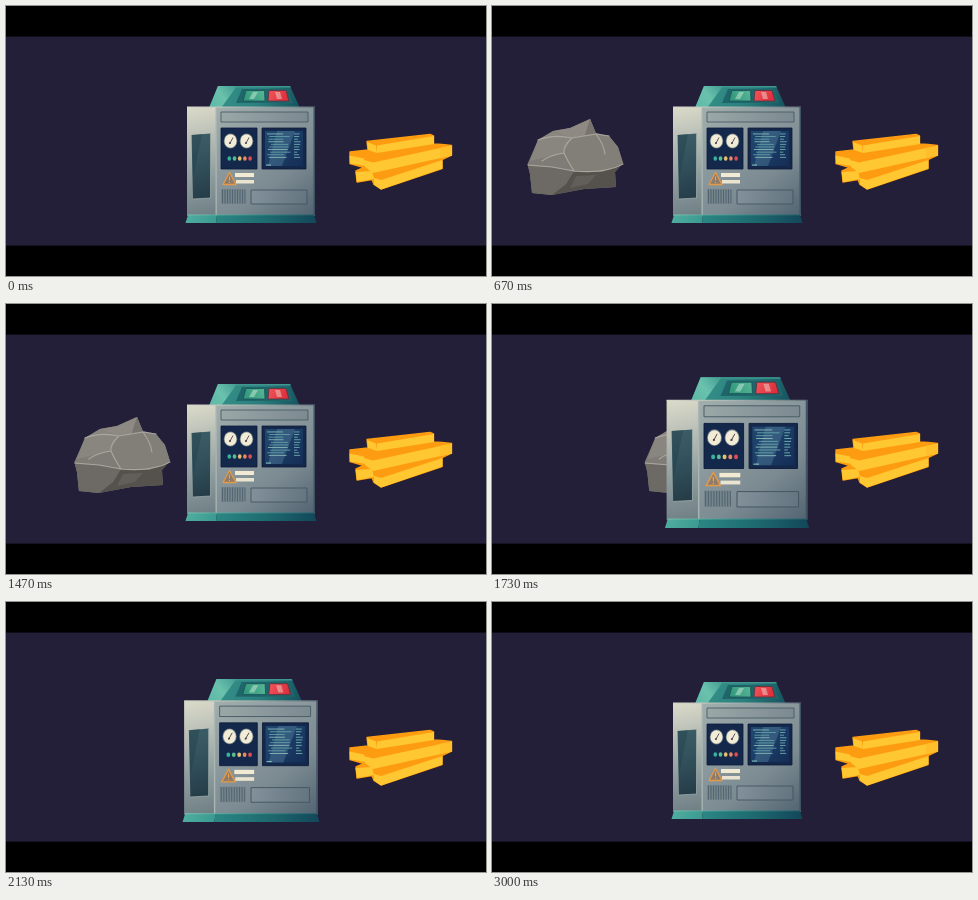
An HTML page with a canvas that plays this animation: 480 by 270 pixels, repeating every 3270 ms.

```html
<!DOCTYPE html>
<html lang="en">
<head>
<meta charset="utf-8">
<title>Rock machine</title>
<style>
html, body { margin: 0; width: 100%; height: 100%; overflow: hidden; background: #000; }
canvas { display: block; width: 480px; height: 270px; }
</style>
</head>
<body>
<canvas id="stage"></canvas>
<script>
const LOOP = 3270, STEP = 1000 / 15, LAST = 48;
const canvas = document.getElementById('stage');
const ratio = window.devicePixelRatio || 1;
canvas.width = 480 * ratio;
canvas.height = 270 * ratio;
const g = canvas.getContext('2d');

// Machine size over time: [ms, scale]
const PULSE = [[1600, 1], [1733, 1.1], [1933, .95], [2067, 1.07], [2133, 1.045], [2267, .98], [2400, 1.01], [2533, 1]];

function shape(d, fill, line, width = 1) {
  const p = new Path2D(d);
  if (fill) { g.fillStyle = fill; g.fill(p); }
  if (line) { g.strokeStyle = line; g.lineWidth = width; g.stroke(p); }
}
function rect(x, y, w, h, fill, line, width = 1) {
  if (fill) { g.fillStyle = fill; g.fillRect(x, y, w, h); }
  if (line) { g.strokeStyle = line; g.lineWidth = width; g.strokeRect(x, y, w, h); }
}
function oval(x, y, rx, ry, fill) {
  g.fillStyle = fill;
  g.beginPath();
  g.ellipse(x, y, rx, ry, 0, 0, Math.PI * 2);
  g.fill();
}
function blend(x1, y1, x2, y2, ...colors) {
  const b = g.createLinearGradient(x1, y1, x2, y2);
  colors.forEach((c, i) => b.addColorStop(i / (colors.length - 1), c));
  return b;
}
function random(seed) {
  return () => (seed = (seed * 16807) % 2147483647) / 2147483647;
}
function pulse(t) {
  if (t <= PULSE[0][0]) return 1;
  for (let i = 1; i < PULSE.length; i++) {
    const [a, from] = PULSE[i - 1], [b, to] = PULSE[i];
    if (t <= b) return from + (to - from) * (1 - Math.cos(Math.PI * (t - a) / (b - a))) / 2;
  }
  return 1;
}

function drawLid() {
  shape('M212 80H284L294 102H203Z', blend(215, 80, 294, 102, '#359088', '#2a7f7d', '#15525e'));
  shape('M212 80H231L215 102H203Z', blend(205, 102, 230, 82, '#5cb8a5', '#6ac2ad', '#459f95'));
  shape('M231 80H284L285 81.500H230Z', '#3f978f');
  shape('M236 83H282L287 97H230Z', '#1f666b');
  shape('M240 84.500H258.500L259 95H237Z', blend(238, 95, 259, 85, '#2f9679', '#58b696'), '#1a5459', .8);
  shape('M263 84.500H280L283 95H262Z', blend(262, 85, 283, 95, '#f0555a', '#da2937'), '#5a3340', .8);
  shape('M247 86H252L248 93H243ZM269 86H274L276 93H271Z', 'rgba(235,250,235,.4)');
}

function drawBody() {
  rect(181, 101, 30, 109, blend(181, 101, 204, 212, '#dcdbc9', '#b3bab4', '#8c9a9c', '#6d7e84'));
  rect(210, 101, 99, 109, blend(210, 101, 300, 215, '#a2afad', '#8d9b9f', '#7b8a91', '#536573'));
  rect(181, 100.500, 128, 1.2, blend(181, 0, 309, 0, '#d8d8c8', '#a5b0ae', '#647680'));
  rect(209.500, 102, 1.3, 107, '#aab6b3');
  rect(307.500, 101, 1.5, 108, '#405362');
  shape('M185.500 129L204.500 127.500V192L187 193Z', blend(186, 128, 204, 192, '#3c5e67', '#314f5a', '#253c48'));
  shape('M186 129L196 128L187 172Z', 'rgba(28,56,68,.35)');
  shape('M204.500 128V192L187 193', null, '#a3b0ac', .7);
  rect(215, 106, 87, 10, blend(215, 106, 302, 116, '#9ba8a7', '#7b8991'), '#495c66', .9);
}

function drawGauges() {
  rect(215, 122, 36, 41, '#14284c', '#0d1b38', .8);
  for (const x of [224.500, 240.500]) {
    oval(x, 135, 6.8, 7.6, '#6d7d83');
    oval(x, 135, 6, 6.8, '#f2ecd6');
    shape(`M${x - 1} 138L${x + 2.500} 131.500`, null, '#4a4550', .9);
    oval(x - .5, 137, 1, 1, '#4a4550');
  }
  ['#36b49b', '#58bd94', '#e9bd70', '#ec8760', '#de4c55'].forEach((c, i) => oval(223.300 + i * 5.200, 152.500, 1.8, 2.2, c));
}

function drawScreen() {
  rect(256, 122, 44, 41, '#14284c', '#0d1b38', .8);
  rect(259, 125, 38, 35, blend(259, 125, 297, 160, '#21486f', '#1b3c66', '#152d55'));
  shape('M271 125H289L276 160H262Z', 'rgba(125,175,190,.25)');
  const rnd = random(71);
  for (let i = 0; i < 10; i++) {
    const y = 127.500 + i * 2.600;
    rect(261 + rnd() * 4, y, 13 + rnd() * 9, .9, i % 3 ? '#5f9da5' : '#84b5b5');
    rect(288, y, 3 + rnd() * 4, .9, '#6aa9ab');
  }
  rect(260, 158.500, 5, 1.1, '#7fb9b5');
}

function drawLower() {
  shape('M223.500 166.500L230 178.500H217Z', '#8f7b69', '#e39a48', 1.3);
  shape('M223.500 170.500V174.500M223.500 176V177', null, '#f0a64c', 1.1);
  rect(229, 167, 19, 4, '#f2ead2');
  rect(230, 174, 18, 3.5, '#e9e3d0');
  rect(215, 183, 24, 15, '#75858c');
  for (let x = 216; x < 239; x += 2.500) rect(x, 183.500, 1, 14, '#536570');
  rect(245, 184, 56, 14, blend(245, 184, 301, 198, '#83919a', '#637480'), '#435662', .9);
  shape('M182 209H211L210 217H179.500Z', blend(180, 209, 211, 217, '#4fae9f', '#3b9a90'));
  shape('M211 209H308L310.500 217H210Z', blend(210, 0, 310, 0, '#2b8784', '#1e6b70', '#12475a'));
  rect(182, 208.500, 126, .9, blend(182, 0, 308, 0, '#7cc3b1', '#3f9690', '#235f69'));
}

function drawMachine(scale) {
  g.save();
  g.translate(245, 148);
  g.scale(scale, scale);
  g.translate(-245, -148);
  drawLid();
  drawBody();
  drawGauges();
  drawScreen();
  drawLower();
  g.restore();
}

function drawFries() {
  const dark = '#fd9c10', light = '#ffc731';
  g.lineJoin = 'round';
  // whole stack in the shaded tone, lit faces on top
  shape('M344 146L362 144L361 135.500L424 128.500L427.500 130V138L436 138.500L445.500 139.500V149L436 153.500V162.500L375 183L368 178.500L366 173.500L351 176L350 165L358 161.500L344 157.500Z', dark, dark, 1.4);
  shape('M343.500 149.500L358 152.500L360 160L344 157.500Z', light);
  shape('M349.500 166L366 165L368 173L351 176Z', light);
  shape('M361 136L370 139.500L371 147L362 144Z', light);
  shape('M371 139.500L428 130V138L371 147Z', light);
  shape('M368 172L375 174V183.500L368 178.500Z', light);
  shape('M375 174L436.500 154V162.500L375 183.500Z', light);
  shape('M358 154L367 156.500L446 139.500V149.500L367 167L359 161Z', light);
  shape('M434 142L446 139.500V149.500L434 152.200Z', '#ffbf2a');
}

function drawRock(dx, dy) {
  g.save();
  g.translate(dx, dy);
  g.lineJoin = g.lineCap = 'round';
  shape('M35.500 158L46 134L61 125L78 122L98 113L104 127L117 130L126 141L131 157L123 166L124 181L92 183L60 189L40 187L38 168Z', '#7f7b76');
  shape('M61 125L78 122L98 113L104 128L80 132Z', '#8e8a83');
  shape('M98 113L104 128L93 129Z', '#77736e');
  shape('M46 134L61 125L80 132L72 147L38 155Z', '#89857f');
  shape('M80 132L104 128L117 130L126 141L131 157L110 165L82 164L72 147Z', '#827e78');
  shape('M36 160L60 161L82 165L74 178L60 189L40 187L38 168Z', '#6d6964');
  shape('M82 165L110 166L130 158L123 166L124 181L92 183L60 189L74 178Z', '#55514d');
  shape('M84 170L104 169L96 178L78 182Z', '#625e59');
  shape('M46 134Q61 128 80 132L104 128L117 130M80 132Q71 140 72 147Q76 156 82 165M72 147Q58 149 50 155M36 159L60 161L82 165Q112 168 131 158M104 128Q112 139 113 148', null, '#aaa69e', 1.2);
  g.restore();
}

function puff(x, y, r, alpha) {
  const c = g.createRadialGradient(x, y, 0, x, y, r);
  c.addColorStop(0, `rgba(226,224,225,${alpha})`);
  c.addColorStop(.5, `rgba(212,210,214,${alpha * .5})`);
  c.addColorStop(1, 'rgba(200,198,206,0)');
  g.fillStyle = c;
  g.fillRect(x - r, y - r, r * 2, r * 2);
}

function drawDust(t) {
  if (t < 320 || t > 660) return;
  const u = (t - 333) / 333, fade = Math.pow(1 - u, 1.4), rnd = random(419);
  for (let i = 0; i < 110; i++) {
    const side = i % 2 ? 1 : -1, far = rnd();
    const x = 84 + side * (10 + far * 90) * (1 + u * .3);
    const y = 184 - far * 13 + (rnd() - .5) * (8 + far * 36) - u * 10;
    const r = (6 + far * 7 + rnd() * 9) * (1 + u * .5);
    puff(x, y, r, (.12 + rnd() * .26) * fade);
  }
  for (let i = 0; i < 32; i++) {
    const x = 84 + (rnd() - .5) * 185, y = 105 + rnd() * 85;
    const r = .3 + rnd() * .5;
    oval(x, y - u * 14, r, r, `rgba(220,218,222,${.5 * fade})`);
  }
}

function draw(t) {
  g.setTransform(ratio, 0, 0, ratio, 0, 0);
  rect(0, 0, 480, 270, '#000');
  rect(0, 30.600, 480, 209, '#231f38');
  drawFries();
  if (t > 260 && t < 1790) {
    const u = Math.max(0, (t - 940) / 840);
    drawRock(140 * Math.pow(u, 3.1), t < 320 ? -80 : 0);
  }
  drawDust(t);
  drawMachine(pulse(t));
}

const start = performance.now();
function tick(now) {
  const t = Math.max(0, now - start) % LOOP;
  draw(Math.min(LAST, Math.floor((t + 5) / STEP)) * STEP);
  requestAnimationFrame(tick);
}
draw(0);
requestAnimationFrame(tick);
</script>
</body>
</html>
```
